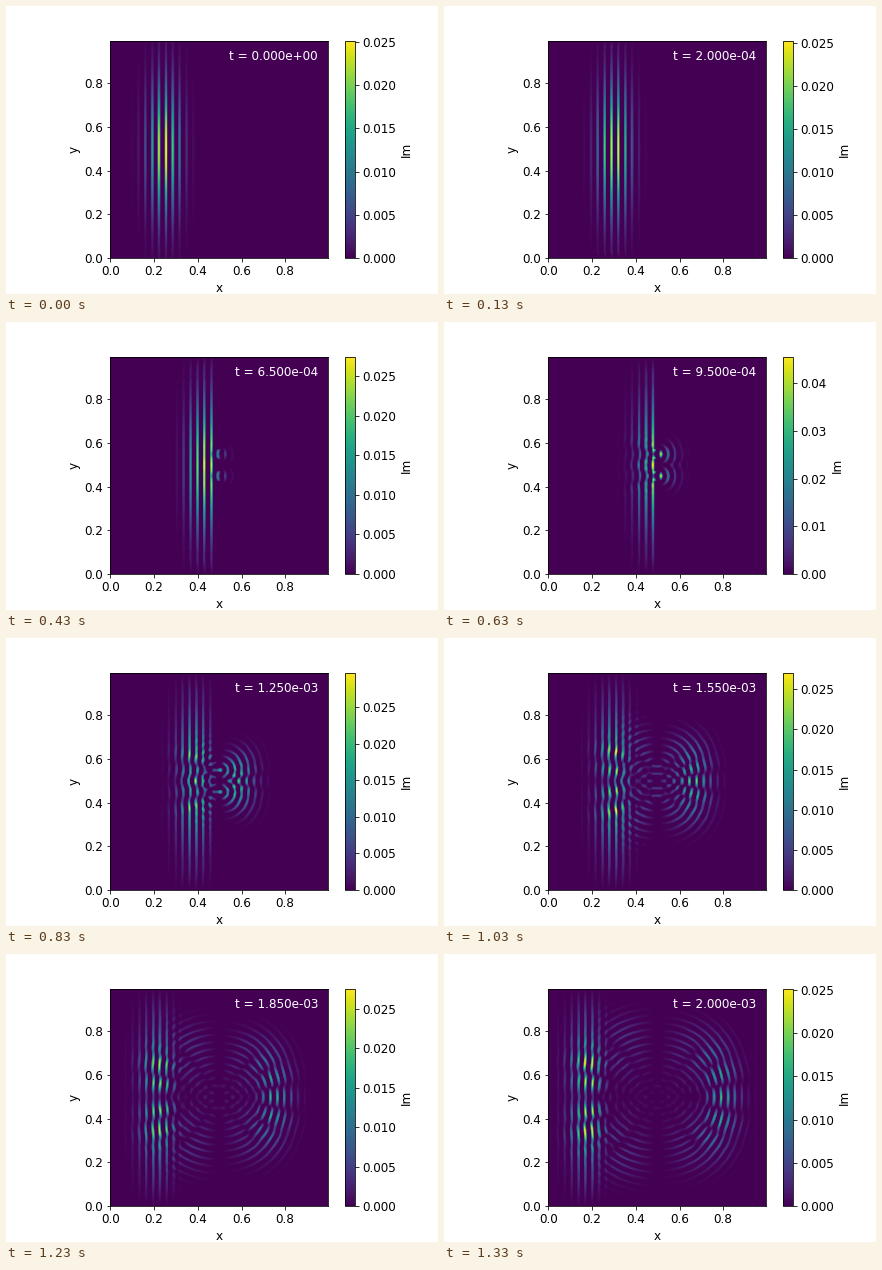
A matplotlib script for the animation above (1.36 s loop, 432x288 px).

```python
import matplotlib.pyplot as plt
import numpy as np
from matplotlib.animation import FuncAnimation

# A wave packet meets a double slit: Crank-Nicolson on the unit square
H = 0.005
DT = 2.5e-5
STEPS_PER_STATE = 2
STATES = 41
TERMS = 24
TICK_MS = 10
LOOP_MS = 1360
FONT = 12

idx = np.arange(1, 200)
X, Y = np.meshgrid(idx * H, idx * H)
col, row = np.meshgrid(abs(idx - 100), abs(idx - 100))
wall = (col <= 2) & ((row <= 5) | (row >= 15))
free = np.where(wall, 0.0, 0.25)


def first_state():
    envelope = -(X - 0.25) ** 2 / (2 * 0.05 ** 2) - (Y - 0.5) ** 2 / (2 * 0.2 ** 2)
    u = np.exp(envelope + 200j * (X - 0.25)) * ~wall
    return u / np.linalg.norm(u)


def neighbour_mean(u):
    total = np.zeros_like(u)
    total[1:] += u[:-1]
    total[:-1] += u[1:]
    total[:, 1:] += u[:, :-1]
    total[:, :-1] += u[:, 1:]
    return total * free


# Implicit operator is g * (z - mean); its inverse is a Chebyshev series
g = 2j * DT / H ** 2
z = (1 + g) / g
root = np.sqrt(z * z - 1)
rho = z - root if abs(z - root) < 1 else z + root
root = z - rho


def step(u):
    older, newer = u, neighbour_mean(u)
    weight = 2 * rho
    total = older + weight * newer
    for _ in range(TERMS):
        older, newer = newer, 2 * neighbour_mean(newer) - older
        weight *= rho
        total += weight * newer
    return 2 * total / (g * root) - u


def simulate():
    u = first_state()
    states = [u.imag.copy()]
    while len(states) < STATES:
        for _ in range(STEPS_PER_STATE):
            u = step(u)
        states.append(u.imag.copy())
    return states


states = simulate()

fig = plt.figure(figsize=(6, 4), dpi=72)
fig.subplots_adjust(left=0.125, right=0.9, bottom=0.125, top=0.88)
ax = fig.add_subplot()
img = ax.imshow(states[0], extent=[0, 0.995, 0, 0.995], cmap="viridis",
                vmin=0, vmax=states[0].max())
ax.set_xlabel("x", fontsize=FONT)
ax.set_ylabel("y", fontsize=FONT)
ax.tick_params(labelsize=FONT)
bar = fig.colorbar(img, ax=ax)
bar.set_label("Im", fontsize=FONT)
bar.ax.tick_params(labelsize=FONT)
clock = ax.text(0.95, 0.95, "", color="white", ha="right", va="top", fontsize=FONT)


def update(tick):
    # 30 states per second, held on a 10 ms clock
    k = min((6 * tick + 3) // 20, STATES - 1)
    img.set_data(states[k])
    img.set_clim(0, states[k].max())
    clock.set_text(f"t = {k * STEPS_PER_STATE * DT:.3e}")
    return img, clock


anim = FuncAnimation(fig, update, frames=LOOP_MS // TICK_MS, interval=TICK_MS,
                     repeat=True, repeat_delay=0, blit=False)
plt.show()
```
